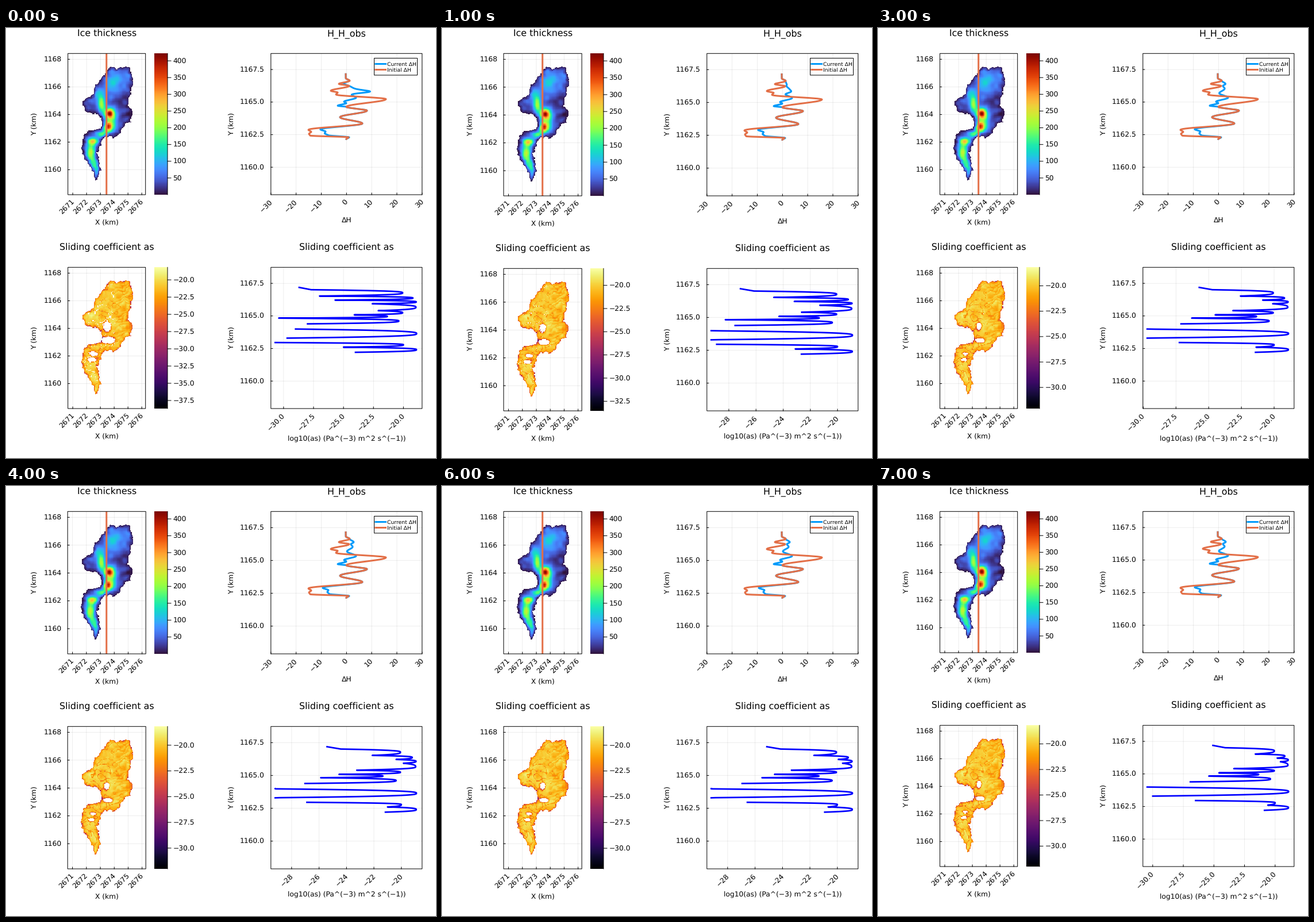
These frames come from a looping animation (748x748 px, 8 s). A matplotlib script:

```python
import numpy as np
import matplotlib.pyplot as plt
from matplotlib.animation import FuncAnimation
from matplotlib.patches import Rectangle
from matplotlib.path import Path

SIZE, DPI = 748, 128
PT = 72 / DPI
FONT = 12.3
BLUE, ORANGE = "#009afa", "#e36f47"
BASE_H = 246          # panel height in the compact layout
STEPS = 8

plt.rcParams.update({"font.family": "DejaVu Sans", "text.hinting": "none",
                     "path.snap": False})
fig = plt.figure(figsize=(SIZE / DPI, SIZE / DPI), dpi=DPI, facecolor="white")
ax = fig.add_axes([0, 0, 1, 1])


def settle(start, end, keep, k):
    """Value after k steps when each step keeps a share of the remaining gap."""
    return end + (start - end) * keep ** k


# ---- glacier fields, on 50 m cells -------------------------------------
OUTLINE = np.array([
    (174, 77), (181, 67), (191, 69), (207, 68), (214, 70), (221, 88),
    (221, 101), (215, 114), (211, 134), (218, 140), (219, 152), (216, 163),
    (207, 167), (198, 182), (186, 194), (180, 186), (166, 195), (158, 221),
    (166, 248), (158, 264), (154, 265), (151, 251), (137, 228), (131, 211),
    (135, 187), (141, 180), (164, 175), (168, 162), (157, 148), (140, 147),
    (131, 133), (133, 126), (150, 117), (156, 99)], float)

# x, y, width, height, thickness
BUMPS = [
    (184, 97, 11, 16, 85), (205, 85, 12, 12, 45), (166, 131, 5, 11, 200),
    (160, 115, 7, 10, 60), (179, 149, 6.5, 7, 340), (177, 171, 6, 7, 340),
    (186, 160, 6, 13, 100), (166, 185, 8, 5, 150), (151, 197, 7, 5, 220),
    (147, 217, 6, 13, 190), (155, 241, 6, 12, 110)]

# x, y, half width, half height
HOLES = [(175, 147, 4, 6), (177, 171, 7, 4), (151, 195, 5, 2.5),
         (149, 205, 5, 2.5)]

NX, NY = 112, 205
gx, gy = np.meshgrid(107.5 + (np.arange(NX) + 0.5) * 135 / NX,
                     44 + (np.arange(NY) + 0.5) * BASE_H / NY)
rng = np.random.default_rng(7)


def smooth_noise(passes):
    n = rng.normal(size=gx.shape)
    for _ in range(passes):
        for axis in (0, 1):
            n = (np.roll(n, 1, axis) + 2 * n + np.roll(n, -1, axis)) / 4
    return n / n.std()


def edge_distance():
    best = np.full(gx.shape, 1e9)
    for (x0, y0), (x1, y1) in zip(OUTLINE, np.roll(OUTLINE, -1, 0)):
        dx, dy = x1 - x0, y1 - y0
        t = np.clip(((gx - x0) * dx + (gy - y0) * dy) / (dx * dx + dy * dy), 0, 1)
        best = np.minimum(best, np.hypot(gx - x0 - t * dx, gy - y0 - t * dy))
    inside = Path(OUTLINE).contains_points(np.c_[gx.ravel(), gy.ravel()])
    return np.where(inside.reshape(gx.shape), best, -best)


dist = edge_distance() + 0.9 * smooth_noise(4)
mask = dist > 0
depth = np.maximum(dist, 0)
rough, coarse, drift, fine = (smooth_noise(p) for p in (12, 16, 12, 2))


def thickness_field():
    h = 26 + 8 * coarse
    for x, y, w, v, a in BUMPS:
        h = h + a * np.exp(-(((gx - x) / w) ** 2 + ((gy - y) / v) ** 2) / 1.6)
    h = h * np.clip(depth / 6, 0, 1) ** 0.8 + 2
    return np.where(mask, np.clip(h, 0, 422), np.nan)


def sliding_field(k):
    """Sliding coefficient as a fraction of the colour range."""
    turn = settle(0.5, 0.15, 0.4, k)
    n = rough * np.cos(turn) + drift * np.sin(turn)
    trunk = (gx < 190) & (depth > 3)
    east = np.clip((gx - 178) / 20, 0, 1) * np.clip((185 - gy) / 20, 0, 1)
    ripple = np.sin(gy * 0.8 + gx * 0.3 + 2 * coarse)
    u = 0.885 + 0.02 * coarse + 0.012 * fine
    u -= 0.19 * np.exp(-(n / 0.14) ** 2) * (1 - 0.6 * east)
    u -= east * (0.025 + 0.035 * ripple)
    u -= (0.2 + 0.12 * np.abs(fine)) * np.exp(-depth / 1.6)
    u[trunk & (np.abs(n) < 0.1 * 0.3 ** k) & (coarse > -0.4)] = np.nan
    grow = settle(1.45, 0.95, 0.5, k)
    for x, y, w, v in HOLES:
        r = np.hypot((gx - x) / (w * grow), (gy - y) / (v * grow)) + 0.16 * rough
        u -= 0.3 * np.exp(-np.maximum(r - 1, 0) * 5)
        u[r < 1] = np.nan
    return np.where(mask, np.clip(u, 0.12, 0.97), np.nan)


ICE = thickness_field()
SLIDING = [sliding_field(k) for k in range(STEPS)]

# ---- profile of thickness difference: turning points ----------------------
HEAD = [(591, 80), (591, 87), (598, 91.5)]
EARLY = [(579, 97), (597, 100.5), (565, 109), (577, 112), (574, 115.5),
         (661, 123.5)]
SHARED = [(592, 137), (628, 143.5), (581, 155), (620, 166)]
FOOT = [(526, 177), (531, 180.5), (527, 184), (529, 187), (596, 190), (592, 193)]
SETTLED = [(605, 97), (600, 100.5), (603, 105), (593, 113), (609, 121),
           (588, 128), (592, 130.5), (577, 135)]
SETTLED_FOOT = [(551, 176), (561, 180), (559, 183), (562, 186.5), (597, 190),
                (592, 193)]


def swing(points):
    """Ease between turning points, so the curve is upright at each."""
    t = np.linspace(0, 1, 16)
    ease = (1 - np.cos(np.pi * t)) / 2
    pairs = list(zip(points, points[1:]))
    return (np.concatenate([a[0] + (b[0] - a[0]) * ease for a, b in pairs]),
            np.concatenate([a[1] + (b[1] - a[1]) * t for a, b in pairs]))


def current_profile(k):
    x, y = swing(HEAD + SETTLED + SHARED + SETTLED_FOOT)
    first = (38 * np.exp(-((y - 110.5) / 3.5) ** 2)
             - 18 * np.exp(-((y - 96.5) / 3) ** 2)
             - 5 * np.exp(-((y - 180) / 6) ** 4))
    return x + settle(first, 0, 0.3, k), y


# ---- profile of sliding coefficient --------------------------------------
# y, first and settled value of the low points, one list per unbroken stretch
CUSPS = [
    [(455, -27.7, -24), (466, -27, -21.5), (473, -25.7, -19.7),
     (479.5, -22.6, -19.5), (491.5, -22.1, -23.4), (498.8, -24.1, -24.6),
     (504.5, -30.4, -25.3), (514.5, -28, -26.9)],
    [(523.5, -29, -30.5), (539.3, -29.7, -30)],
    [(547, -30.7, -26.4), (555, -25, -20.5), (564, -24, -20.8)]]
LOWEST = [-30.7, -29.3, -29.4, -29.7, -29.2, -30.1, -29.2, -30.45]
HIGHEST = -18.8
C_MAX = -18.18


def tip(y):
    """Envelope of the high points."""
    dips = ((2.5, 503, 9), (1.2, 459, 9), (1.1, 551, 4))
    return -18.9 - sum(a * np.exp(-((y - c) / w) ** 2) for a, c, w in dips)


def sliding_curve(cusps, k):
    """Round at the tips, pointed at the low points."""
    t = np.linspace(0, 1, 30)
    vs, ys = [], []
    for (y0, *v0), (y1, *v1) in zip(cusps, cusps[1:]):
        mid = (y0 + y1) / 2
        top = tip(mid)
        low0, low1 = (settle(*v, 0.58, k) for v in (v0, v1))
        vs += [top + (low0 - top) * (1 - t) ** 3, top + (low1 - top) * t ** 3]
        ys += [y0 + (mid - y0) * t, mid + (y1 - mid) * t]
    return np.concatenate(vs), np.concatenate(ys)


# ---- drawing helpers -----------------------------------------------------
def line(x, y, color="black", width=1.0, z=3, **kw):
    ax.plot(x, y, color=color, lw=width * PT, zorder=z,
            solid_joinstyle="round", **kw)


def frame(x, y, w, h, fill="none", z=4):
    ax.add_patch(Rectangle((x, y), w, h, fc=fill, ec="black", lw=PT, zorder=z))


def label(x, y, s, size=FONT, ha="center", rot=0):
    """Text whose capitals are centred on (x, y)."""
    drop, a = 0.3645 * size, np.radians(rot)
    ax.text(x + drop * np.sin(a), y + drop * np.cos(a), s, fontsize=size * PT,
            ha=ha, va="baseline", rotation=rot, rotation_mode="anchor", zorder=6)


def number(v, digits):
    return f"{v:.{digits}f}".replace("-", "\u2212")


def panel(box, xticks, yticks, title, xlabel, xlabel_gap):
    l, r, t, b = box
    for x, s in xticks:
        line([x, x], [t, b], width=0.7, alpha=0.1, z=1)
        line([x, x], [b, b - 3])
        label(x + 0.5, b + 10, s, ha="right", rot=45)
    for y, s in yticks:
        line([l, r], [y, y], width=0.7, alpha=0.1, z=1)
        line([l, l + 3], [y, y])
        label(l - 10.8, y, s, ha="right")
    frame(l, t, r - l, b - t)
    mid = (l + r) / 2
    label(mid, t - 36, title, 15.9)
    label(mid, b + xlabel_gap - 0.7, xlabel)
    label(48 if l < 200 else 390.5, (t + b) / 2, "Y (km)", rot=90)


def map_panel(box, field, cmap, top, title):
    l, r, t, b = box
    unit = (b - t) / 10.23
    xticks = [((l + r) / 2 + (v - 2673.46) * unit, str(v)) for v in range(2671, 2677)]
    yticks = [(t + (1168.42 - v) * unit, str(v)) for v in range(1160, 1169, 2)]
    panel(box, xticks, yticks, title, "X (km)", 48)
    ax.imshow(field, extent=(l, r, b, t), cmap=cmap, vmin=0, vmax=top,
              interpolation="nearest", aspect="auto", zorder=2)


def colorbar(t, b, cmap, low, high, ticks, digits):
    ax.imshow(np.linspace(1, 0, 256)[:, None], extent=(258, 281, b, t), cmap=cmap,
              vmin=0, vmax=1, aspect="auto", zorder=2)
    line([281, 281], [t, b])
    for v in ticks:
        if low < v < high:
            y = t + (high - v) * (b - t) / (high - low)
            line([281, 287], [y, y])
            label(290.3, y, number(v, digits), ha="left")


def profile_ticks(t, b):
    unit = (b - t) / 10.84
    return [(t + (1168.73 - v) * unit, f"{v:.1f}")
            for v in (1160, 1162.5, 1165, 1167.5)]


def legend():
    frame(640.5, 52.5, 75, 29.5, "white", 5)
    for y, color, s in ((62.5, BLUE, "Current ΔH"), (72.5, ORANGE, "Initial ΔH")):
        line([643, 660.5], [y, y], color, 3, z=6)
        label(663, y, s, 9.33, ha="left")


def difference_panel(box, k):
    l, r, t, b = box
    scale = (b - t) / BASE_H
    xticks = [((l + r) / 2 + v * (r - l) / 60, number(v, 0))
              for v in range(-30, 31, 10)]
    panel(box, xticks, profile_ticks(t, b), "H_H_obs", "ΔH", 44)
    initial = swing(HEAD + EARLY + SHARED + FOOT)
    for (x, y), color in ((current_profile(k), BLUE), (initial, ORANGE)):
        line(x, t + (y - 44) * scale, color, 3)
    legend()


def sliding_panel(box, k, tall):
    l, r, t, b = box
    low, pad = LOWEST[k], 7.45
    unit = (r - l - 2 * pad) / (HIGHEST - low)

    def px(v):
        return l + pad + (np.clip(v, low, HIGHEST) - low) * unit

    step, digits = (2, 0) if tall else (2.5, 1)
    xticks = [(l + pad + (v - low) * unit, number(v, digits))
              for v in np.arange(-40, -9, step)]
    xticks = [(x, s) for x, s in xticks if l <= x <= r]
    panel(box, xticks, profile_ticks(t, b), "Sliding coefficient as",
          "log10(as) (Pa^(\u22123) m^2 s^(\u22121))", 44 if tall else 52)
    for cusps in CUSPS:
        v, y = sliding_curve(cusps, k)
        if cusps is CUSPS[0]:
            v, y = np.r_[v[0] - 1, v], np.r_[451, y]
        line(px(v), t + (y - 416) * (b - t) / BASE_H, "#0000ff", 2.7)


def draw(k):
    ax.clear()
    # short tick labels leave more height for the panels
    tall = LOWEST[k] > -29.5
    left = (107.2, 243.2) if tall else (107.7, 242.7)
    right = (460.8, 723.8)
    upper = (44.3, 292) if tall else (44.3, 290)
    lower = (418.3, 666) if tall else (416.3, 662)

    map_panel(left + upper, ICE, "turbo", 422, "Ice thickness")
    line([174.8, 174.8], upper, ORANGE, 3, solid_capstyle="butt")
    colorbar(*upper, "turbo", 0, 422, range(50, 401, 50), 0)
    difference_panel(right + upper, k)

    map_panel(left + lower, SLIDING[k], "inferno", 1, "Sliding coefficient as")
    colorbar(*lower, "inferno", settle(-38.67, -32, 0.23, k), C_MAX,
             np.arange(-37.5, -19, 2.5), 1)
    sliding_panel(right + lower, k, tall)

    ax.set_xlim(0, SIZE)
    ax.set_ylim(SIZE, 0)
    ax.axis("off")
    return []


anim = FuncAnimation(fig, draw, frames=STEPS, interval=1000, repeat=True)
plt.show()
```
